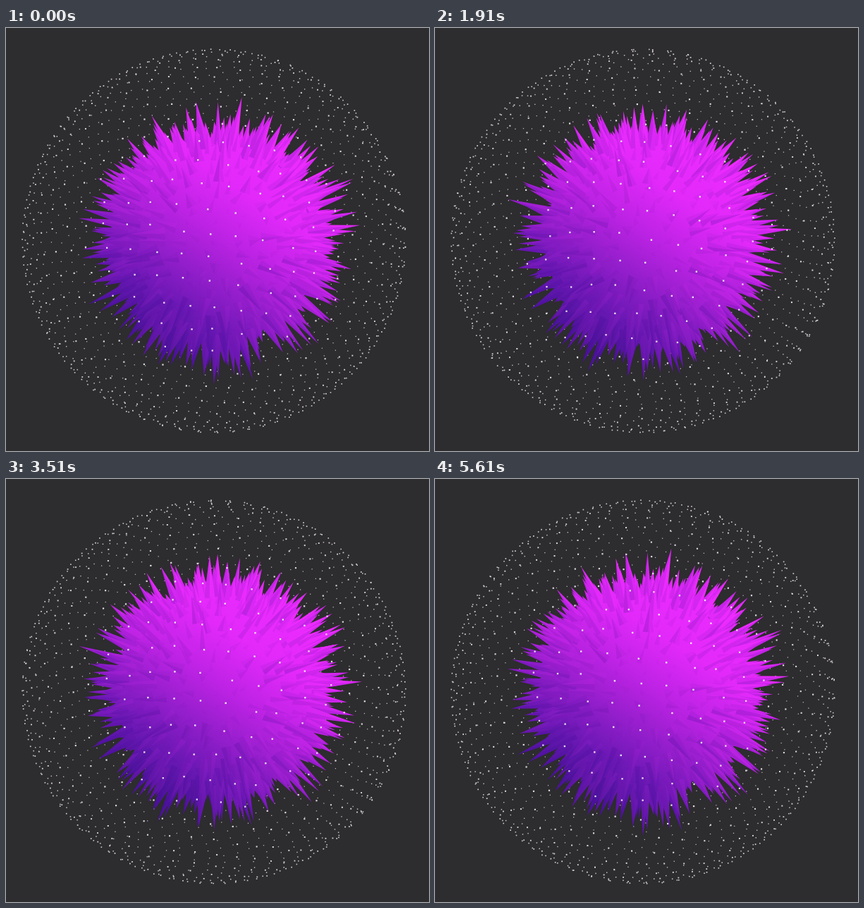
An HTML page with a canvas that plays this animation: 600x600 px, repeating every 5660 ms.

```html
<!DOCTYPE html>
<html lang="en">
<head>
<meta charset="utf-8">
<title>Spiky ball in a sphere of dots</title>
<style>
html, body { margin: 0; width: 100%; height: 100%; overflow: hidden; background: #2d2c2e; }
canvas { display: block; }
</style>
</head>
<body>
<canvas id="stage" width="600" height="600"></canvas>
<script>
const ctx = document.getElementById('stage').getContext('2d');
const TAU = Math.PI * 2;
const LOOP = 5660, HOLD = 110, STEP = 50, STEPS = 112;

// Lengths in space are in radii of the dot sphere.
const CAMERA = 2.15;
const ZOOM = 272 * Math.sqrt(CAMERA * CAMERA - 1);
const DOTS = 1800, SPIKES = 820;
const ROOT = 0.55, CORE = 0.575;

function seeded(seed) {
  return () => {
    seed = (seed * 1664525 + 1013904223) % 4294967296;
    return seed / 4294967296;
  };
}
const rand = seeded(71);
const spread = size => (rand() - 0.5) * size;

// Evenly spread directions, slightly shaken.
function directions(count, shake) {
  return Array.from({ length: count }, (_, i) => {
    const y = 1 - 2 * (i + 0.5) / count;
    const r = Math.sqrt(1 - y * y);
    const a = i * Math.PI * (3 - Math.sqrt(5)) + spread(shake);
    return [r * Math.cos(a), y, r * Math.sin(a)];
  });
}

const dots = directions(DOTS, 0.03);

const spikes = directions(SPIKES, 0.12).map(dir => ({
  dir,
  length: 0.6 + 0.185 * Math.pow(rand(), 1.1),
  swing: 0.008 + rand() * 0.016,
  phase: rand() * TAU,
  width: 5.5 + rand() * 3.5,
  lean: [spread(0.05), spread(0.05), spread(0.05)],
  tint: rand()
}));

const skin = ctx.createLinearGradient(385, 170, 208, 445);
[[0, '#ec2bff'], [0.24, '#e229fa'], [0.45, '#bd23e4'], [0.64, '#931ecb'],
 [0.82, '#6a18b4'], [1, '#4d149b']].forEach(stop => skin.addColorStop(...stop));

const turn = (u, v, a) => [u * Math.cos(a) - v * Math.sin(a), u * Math.sin(a) + v * Math.cos(a)];

// The whole scene turns to the right, upwards and a little clockwise.
function rotate([x, y, z], swing) {
  [x, y] = turn(x, y, 0.6 + 0.11 * swing);
  [z, x] = turn(z, x, 0.3 + 0.31 * swing);
  [y, z] = turn(y, z, 0.26 * swing);
  return [x, y, z];
}

function project([x, y, z], cx, cy) {
  const k = ZOOM / (CAMERA - z);
  return [cx + x * k, cy + y * k];
}

function polygon(points, fill) {
  ctx.beginPath();
  points.forEach(p => ctx.lineTo(p[0], p[1]));
  ctx.fillStyle = fill;
  ctx.fill();
}

function drawSpike({ root, tip, spike }) {
  const [x0, y0] = project(root, 300, 300);
  const [x1, y1] = project(tip, 300, 300);
  const long = Math.hypot(x1 - x0, y1 - y0) || 1;
  const nx = -(y1 - y0) / long * spike.width, ny = (x1 - x0) / long * spike.width;
  const a = [x0 + nx, y0 + ny], b = [x0 - nx, y0 - ny];
  polygon([a, [x1, y1], b], skin);

  // Light comes from the upper right; the other side of each spike is darker.
  const side = Math.min(1, long / 45);
  const dark = nx - ny < 0 ? a : b;
  polygon([[x0, y0], [x1, y1], dark], `rgba(60,12,140,${0.15 * side})`);
  const tone = spike.tint < 0.5 ? '70,16,150' : '240,50,255';
  polygon([a, [x1, y1], b], `rgba(${tone},${0.09 * side})`);
}

function drawBall(swing) {
  const r = ZOOM * CORE / Math.sqrt(CAMERA * CAMERA - CORE * CORE);
  const core = new Path2D();
  core.arc(300, 300, r, 0, TAU);

  const placed = spikes.map(spike => {
    const length = spike.length + spike.swing * Math.sin(spike.phase + swing * 4);
    const axis = spike.dir.map((v, i) => v + spike.lean[i]);
    return {
      spike,
      root: rotate(spike.dir, swing).map(v => v * ROOT),
      tip: rotate(axis, swing).map(v => v * length)
    };
  }).sort((p, q) => p.tip[2] - q.tip[2]);

  placed.filter(p => p.root[2] < 0).forEach(drawSpike);
  ctx.fillStyle = skin;
  ctx.fill(core);
  placed.filter(p => p.root[2] >= 0).forEach(drawSpike);
}

function drawDots(list) {
  list.forEach(dot => {
    const depth = CAMERA - dot[2];
    const size = Math.max(1.25, 2.8 / depth);
    const [x, y] = project(dot, 295, 302);
    ctx.fillStyle = `rgba(242,238,245,${Math.min(0.95, 0.58 + 0.4 / depth)})`;
    ctx.fillRect(x - size / 2, y - size / 2, size, size);
  });
}

function draw(step) {
  const swing = 1 - Math.abs(2 * step / STEPS - 1);
  const placed = dots.map(dot => rotate(dot, swing));
  ctx.fillStyle = '#2d2c2e';
  ctx.fillRect(0, 0, 600, 600);
  drawDots(placed.filter(dot => dot[2] < 0));
  drawBall(swing);
  drawDots(placed.filter(dot => dot[2] >= 0));
}

const start = performance.now();
let shown = -1;
function tick() {
  const t = (performance.now() - start) % LOOP;
  const step = t < HOLD ? 0 : 1 + Math.floor((t - HOLD) / STEP);
  if (step !== shown) draw(shown = step);
  requestAnimationFrame(tick);
}
tick();
</script>
</body>
</html>
```
